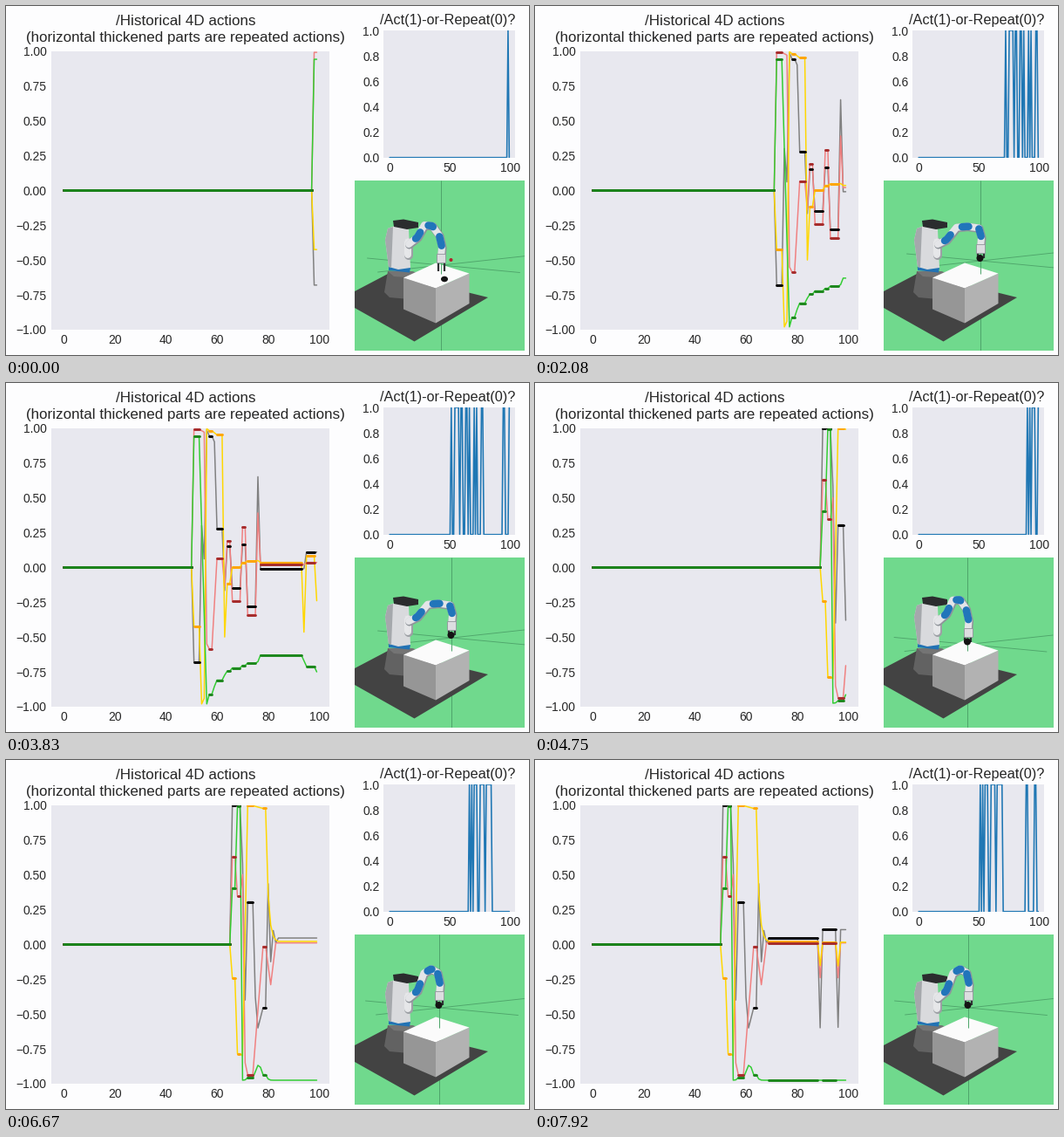
Write a matplotlib script that moves like this. It is 600x400 px and loops after 8 s.

```python
import numpy as np
import matplotlib.pyplot as plt
from matplotlib.animation import FuncAnimation
from matplotlib.patches import Polygon, Rectangle, Ellipse, Circle

W, H, DPI = 600, 400, 100
FRAMES, TICK = 200, 40
PT = 72 / DPI
N = 100  # history length

plt.rcParams.update({
    "font.family": "Liberation Sans", "font.size": 10,
    "text.color": "#262626", "xtick.color": "#262626", "ytick.color": "#262626",
    "lines.solid_capstyle": "round",
})

# Steps at which the agent acts; every other step repeats the last action
ACTS = [
    (1, 4, 5, 6, 7, 9, 10, 13, 14, 16, 20, 22, 26, 27, 44, 45, 49),
    (1, 3, 5, 6, 7, 10, 11, 12, 13, 15, 16, 17, 18, 19, 39, 40, 46, 47),
]


def grasp_and_sway(m):
    """m-th action: descend, grip, lift, sway with growing swing, settle."""
    z = np.interp(m, [0, 1, 2, 3, 6], [-.425, -.98, -.94, .995, .95])
    g = .94 if m == 0 else max(.94 - .64 * m, -.63 - .35 * .8 ** (m - 3))
    if m < 7:
        x = np.interp(m, [0, 1, 2, 3, 5, 6], [-.68, .3, .06, .985, .9, .28])
        y = np.interp(m, [0, 2, 3, 4, 6], [.99, .97, -.55, -.585, .065])
    elif m < 13:
        sway = (-1) ** m
        x = sway * (.15 + .5 * ((m - 8.5) / 3.5) ** 4)
        y = sway * (.14 + .05 * (m - 7))
        z = .05 - .55 * .3 ** (m - 7)
    else:
        late = m > 14
        x, y, z = -.01 + .12 * late, .02 + .015 * late, .035 + .045 * late
        z -= .5 * (m == 14) + .32 * (m == 16)
        g = -.63 - .04 * (m - 13)
    return x, y, z, max(g, -.98)


def grasp_and_ring(m):
    """m-th action: descend, grip, lift, ring down, then two short jolts."""
    x = np.interp(m, [0, 1, 2, 3, 4, 5, 6, 8], [.995, .995, .58, -.4, .305, -.38, -.6, -.455])
    y = np.interp(m, [0, 1, 2, 3, 4, 8, 10, 12], [.63, .345, .5, -.85, -.935, -.015, -.29, .01])
    z = np.interp(m, [0, 1, 2, 4, 8], [-.24, -.785, -.8, .995, .975])
    if m > 8:
        x = .035 + .4 * (-.4) ** (m - 9) + .07 * (m > 13)
        z = .015 + .96 * .36 ** (m - 8)
    if m in (14, 16):
        x, y, z = x - .7, y - .25, z - .17
    g = (.405, .99)[m] if m < 2 else -.975 + .11 * np.exp(-((m - 6.3) / 1.7) ** 2)
    return x, y, z, g


POLICY = [grasp_and_sway, grasp_and_ring]


def history(zero_end, ep):
    """Values, act flags and finished repeats of the last N steps."""
    vals, flags = np.zeros((N, 4)), np.zeros(N)
    starts = [zero_end + j for j in ACTS[ep] if zero_end + j < N]
    for m, s in enumerate(starts):
        vals[s:] = POLICY[ep](m)
    flags[starts] = 1
    held = [(a, b - 1) for a, b in zip([0] + starts, starts) if b - a > 1]
    return vals, flags, held


fig = plt.figure(figsize=(W / DPI, H / DPI), dpi=DPI, facecolor="#fdfdfe")


def panel(x0, y0, x1, y1, face):
    ax = fig.add_axes([x0 / W, 1 - y1 / H, (x1 - x0) / W, (y1 - y0) / H], facecolor=face)
    for s in ax.spines.values():
        s.set_visible(False)
    ax.tick_params(length=0, pad=3.5)
    return ax


def label(x, y, text, size):
    fig.text(x / W, 1 - y / H, text, size=size, ha="center", va="baseline")


left = panel(51.5, 51.5, 371, 371, "#e8e8ef")
left.set(xlim=(-4.95, 103.95), ylim=(-1, 1), xticks=range(0, 101, 20),
         yticks=np.linspace(-1, 1, 9))
left.yaxis.set_major_formatter("{x:.2f}")
right = panel(433.3, 28, 584.2, 173.7, "#e8e8ef")
right.set(xlim=(-4.95, 103.95), ylim=(0, 1), xticks=(0, 50, 100),
          yticks=np.linspace(0, 1, 6))
label(206, 22.5, "/Historical 4D actions", 12.25)
label(206, 41, "(horizontal thickened parts are repeated actions)", 12.25)
label(506.5, 21, "/Act(1)-or-Repeat(0)?", 11.7)

steps = np.arange(N)
thin = [left.plot([], [], c=c, lw=1.5 * PT, zorder=2)[0]
        for c in ("gray", "lightcoral", "gold", "limegreen")]
thick = [left.plot([], [], c=c, lw=2.9 * PT, zorder=z)[0]
         for c, z in (("black", 5), ("brown", 4), ("orange", 3), ("#1c861c", 6))]
act_line, = right.plot([], [], c="#1f77b4", lw=1.6 * PT)

# Camera view, in stage pixels
view = panel(400, 200, 595, 395, "#70d98d")
view.set(xlim=(400, 595), ylim=(395, 200), xticks=[], yticks=[])


def poly(pts, color, z):
    view.add_patch(Polygon(pts, fc=color, ec="none", zorder=z))


def stroke(color, width, z, pts=None, cap="round"):
    xs, ys = zip(*pts) if pts else ((), ())
    return view.plot(xs, ys, c=color, lw=width * PT, zorder=z, solid_capstyle=cap)[0]


poly([(400, 327), (440, 306), (553, 334), (468.5, 384.5), (400, 346)], "#434343", 2)
# base and torso
poly([(438, 304), (465, 304), (481, 308), (482, 333), (462, 336), (440, 334), (434, 328)], "#626262", 3)
poly([(438, 304), (465, 304), (481, 308), (476, 312), (445, 310)], "#747474", 3)
poly([(439, 297), (464, 300), (463, 305.5), (439, 303)], "#2272b4", 4)
poly([(438, 255), (446, 252), (462, 256), (464, 300), (450, 302), (439, 299), (435, 268)], "#d9dadd", 4)
poly([(438, 255), (444, 253), (442, 300), (439, 299), (435, 268)], "#a5a8ac", 5)
poly([(444, 246), (456, 244.5), (473, 248), (473, 254), (460, 256), (445, 253)], "#2b2c2e", 7)
stroke("#9da0a5", 10, 5, [(461.5, 271), (461.5, 286)])
stroke("#e6e7e9", 8, 6, [(461, 270), (461, 285)])
# table
A, B, C, D = (456, 311.5), (493, 323.5), (531.5, 306.5), (493, 294.5)
poly([A, B, (493, 363.5), (456, 347.5)], "#969696", 5)
poly([B, C, (531.5, 341), (493, 363.5)], "#b2b2b2", 5)
poly([A, B, C, D], "#fbfbfb", 5)

CROSS, WHITE, BLUE, SHADE = "#4fa56b", "#e4e5e8", "#2175ba", "#8f949a"
cross = [stroke(CROSS, .9, 1), stroke(CROSS, .9, 1),
         stroke(CROSS, 1, 6, cap="butt"), stroke(CROSS, 1, 1, cap="butt")]
core, skin = stroke(SHADE, 9.5, 8), stroke(WHITE, 8, 9)
SLEEVES = [(.8, 1.4), (2.5, 3.1), (4.1, 4.9)]  # blue spans along the joints
sleeves = [stroke(BLUE, 8.5, 9.5) for _ in SLEEVES]
fingers = [stroke("#303235", 2.2, 10, cap="butt") for _ in range(2)]
palm = view.add_patch(Rectangle((0, 0), 10, 10, fc="#dcdde0", ec=SHADE, lw=.6, zorder=10))
block = view.add_patch(Ellipse((0, 0), 8, 6.5, fc="#141414", zorder=11))
ball = view.add_patch(Circle((0, 0), 2, fc="#b3202a", zorder=7))

READY = np.array([(462, 273), (472, 265), (480, 251), (489, 252),
                  (497, 263), (500, 276), (499, 289)], float)
FOLLOW = np.array([0, 0, .3, .6, 1, 1, 1])  # share of the hand's move
SAG = np.array([0, .25, .5, .6, .2, 0, 0])  # elbows sink as the arm extends
GRASP, LIFT = [(503, 301), (496, 301)], [(511, 278), (497, 270)]
TARGET = [(510.5, 291), (497, 281)]


def draw_robot(ep, j):
    path = np.array([READY[-1], GRASP[ep], GRASP[ep], LIFT[ep]])
    hx, hy = (np.interp(j, [2, 5, 7, 13], path[:, a]) for a in (0, 1))
    move = np.array([hx, hy]) - READY[-1]
    arm = READY + FOLLOW[:, None] * move
    arm[:, 1] += SAG * move[0]

    core.set_data(arm[:, 0] + .8, arm[:, 1] + .8)
    skin.set_data(*arm.T)
    joints = np.arange(len(arm))
    for ln, (a, b) in zip(sleeves, SLEEVES):
        t = np.linspace(a, b, 5)
        ln.set_data(np.interp(t, joints, arm[:, 0]), np.interp(t, joints, arm[:, 1]))

    held = j >= 6
    palm.set_xy((hx - 5, hy - 5))
    for f, side in zip(fingers, (-1, 1)):
        f.set_data([hx + 3.5 * side] * 2, [hy + 5, hy + (11 if held else 15)])
    gx, gy = GRASP[ep]
    block.center = (hx - .5, hy + 11) if held else (gx, gy + 12)
    block.height = 8 if held else 6.5
    ball.center = TARGET[ep]

    cx, cy = hx - .5, hy + (14 if held else 8)
    cross[0].set_data([cx - 84, cx + 91], [cy - 8, cy + 8.5])
    cross[1].set_data([cx - 72, cx + 98], [cy + 8, cy - 10.5])
    cross[2].set_data([cx, cx], [200, 307])
    cross[3].set_data([cx, cx], [345, 395])


def draw(k):
    # 12 pictures a second, showing 12.5 steps a second
    shot = (k * TICK + 34) * 12 // 1000
    n = shot * 25 // 24
    ep = int(n >= 50)
    zero_end = (97, 148)[ep] - n
    vals, flags, held = history(zero_end, ep)
    for c in range(4):
        thin[c].set_data(steps, vals[:, c])
        thick[c].set_data([x for a, b in held for x in (a, b, np.nan)],
                          [y for a, b in held for y in (vals[a, c], vals[b, c], np.nan)])
    act_line.set_data(steps, flags)
    draw_robot(ep, N - 1 - zero_end)
    return []


anim = FuncAnimation(fig, draw, frames=FRAMES, interval=TICK,
                     init_func=lambda: draw(0), repeat=True, repeat_delay=0, blit=False)
plt.show()
```
